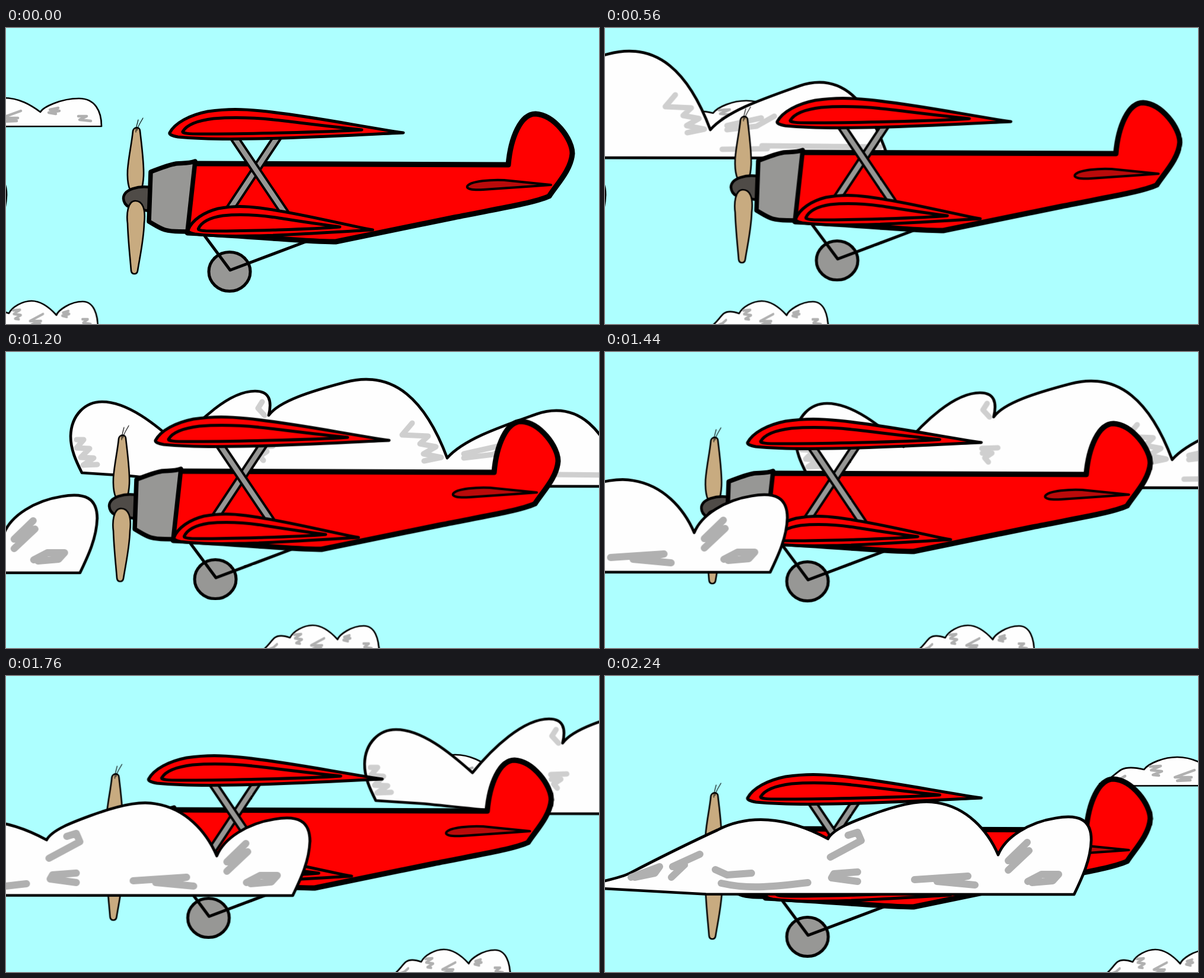
Write an HTML page that moves like this. It is 1000 px wide and 500 px high and loops after 2320 ms.

```html
<!DOCTYPE html>
<html lang="en">
<head>
<meta charset="utf-8">
<title>Biplane</title>
<style>
  html, body { margin: 0; width: 100%; height: 100%; overflow: hidden; background: #adffff; }
  svg { display: block; width: 100%; height: 100%; }
  path, ellipse { stroke: #000; stroke-linejoin: round; stroke-linecap: round; }
  .line { fill: none; }
  .white { fill: #fefefe; }
  .red { fill: #f00; }
  .metal { fill: #979795; }
  .wood { fill: #c8ab80; stroke-width: 2.6; }
  .shade { fill: none; stroke: #b0b0b0; stroke-width: 12; }
  .pale { stroke: #cfcfcf; stroke-width: 9; }
  .fine { stroke-width: 4.5; }
  .fixed { vector-effect: non-scaling-stroke; }

  /* 29 ticks of 80 ms; the last pose holds for one tick */
  .move { animation: drift 2320ms steps(28) -1ms infinite; }
  #high { --x0: 0px; --y0: 0px; --x1: 969px; --y1: 19px; }
  #low { --x0: 0px; --y0: 0px; --x1: 885px; --y1: 1px; }
  #big { --x0: -1062px; --y0: -13.5px; --x1: 920.4px; --y1: 11.8px; }
  #plane { animation-name: fly; }
  #front { animation-name: enter; }
  @keyframes drift {
    0% { transform: translate(var(--x0), var(--y0)); }
    96.552%, 100% { transform: translate(var(--x1), var(--y1)); }
  }
  @keyframes fly {
    0% { transform: translate(0, 0); animation-timing-function: steps(8); }
    27.586% { transform: translate(16.5px, -21.5px); animation-timing-function: steps(9); }
    58.621% { transform: translate(-35.5px, -29.5px); animation-timing-function: steps(11); }
    96.552%, 100% { transform: translate(-35.5px, 29px); }
  }
  @keyframes enter {
    0%, 41.379% { transform: translate(-820px, 5px); animation-timing-function: steps(16); }
    96.552%, 100% { transform: translate(0, 0); }
  }
</style>
</head>
<body>
<svg viewBox="0 0 1000 500">
  <defs>
    <g id="puff">
      <path class="white fixed" stroke-width="2.7" d="M-135 163C-118 158-110 146-98 139C-88 134-72 136-60 139C-52 128-26 118-4 118C22 118 42 130 58 142C62 134 92 119 123 119C150 119 161 140 161 166L-80 166.500Z"/>
      <path class="shade fine" d="M-50 134L-32 133L-48 140L-30 142L-45 148L-35 149M25 140L-8 152L20 152L-4 158L18 157M88 135L74 138L90 140L72 143L84 145M122 149L136 149L124 155L143 157M-92 150L-102 156L-110 158L-98 159"/>
    </g>
    <g id="wing" stroke-width="5">
      <path class="red fixed" d="M276 177C285 160 310 147 340 141C375 136 400 137 430 140C510 148 590 165 670 177C600 180 500 186 420 187C370 188 320 187 290 184C280 182 275 180 276 177Z"/>
      <path class="line fixed" d="M298 175C305 163 325 156 350 153C390 150 430 152 470 157C520 163 560 168 600 172C540 176 400 179 330 179C308 179 297 178 298 175Z"/>
    </g>
  </defs>

  <g id="high" class="move"><use href="#puff"/></g>
  <g id="low" class="move"><use href="#puff" transform="translate(45.600 343) scale(.68 1)"/></g>

  <g id="big" class="move">
    <path class="white" stroke-width="4.700" d="M128 204C118 184 109 165 109 142C110 106 134 84 162 84C205 84 252 122 291 157C325 115 377 66 420 66C444 66 449 82 443 107C460 83 515 66 572 51C655 29 708 83 744 179C772 147 835 126 894 105C965 81 1012 130 1044 227L371 226C300 219 250 213 205 209Z"/>
    <path class="shade pale" d="M119 148L131 148L119 162L141 163L126 178L148 179L130 191L154 190M432 84L425 95L436 107M423 160L450 159M424 168L440 168L428 176L434 183M685 120L668 140L712 142L698 155L725 160L704 172L734 178L705 184M772 172L830 159M772 179L822 173L852 156M764 212L840 211M831 206L1030 208"/>
  </g>

  <g id="plane" class="move">
    <path class="wood" d="M214 174C215 167 226 166 226 174C229 200 233 230 232 250C231 268 228 282 218 282C208 280 204 262 205 240C207 215 212 195 214 174Z"/>
    <path class="line" stroke-width="1.100" d="M219 176C219 168 221 163 223 155M221 173C223 164 227 160 231 152"/>
    <path stroke-width="4.500" fill="#4f4b47" d="M243 269C225 266 198 272 198 288C199 303 215 306 222 306L241 309Z"/>
    <path class="wood" d="M218 292C205 292 203 315 205 330C206 360 209 385 211 410C212 417 221 417 222 410C225 390 232 360 233 330C236 305 230 292 218 292Z"/>

    <ellipse class="metal" stroke-width="5" cx="377" cy="411.500" rx="35" ry="33"/>
    <path class="line" stroke-width="5" d="M332 347L378 409L508 360"/>

    <path class="red" stroke-width="9" d="M318 229L847 231C851 185 868 145 893 145C925 147 955 188 955 212C953 240 928 265 916 284C890 296 820 307 756 320L556 361C520 362 440 353 306 346"/>
    <path fill="#ba0a0a" stroke-width="4" d="M778 267C784 258 820 256 840 257C870 260 900 263 919 265C880 268 835 271 805 273C785 274 776 272 778 267Z"/>

    <g class="line" stroke-linecap="butt">
      <path stroke-width="16" d="M458 184L376 308"/>
      <path style="stroke:#979795" stroke-width="8" d="M458 184L376 308"/>
      <path stroke-width="16" d="M384 184L470 312"/>
      <path style="stroke:#979795" stroke-width="8" d="M384 184L470 312"/>
    </g>
    <use href="#wing"/>
    <use href="#wing" transform="translate(89 164) scale(.79 1)"/>
    <path class="metal" stroke-width="7.500" d="M244 243C262 236 275 231 287 229C298 228 308 229 319 225L306 344C290 343 282 345 268 341C258 338 250 332 241 327Z"/>
  </g>

  <g id="front" class="move">
    <path class="white" stroke-width="4.700" d="M-40 357C-10 347 25 342 42 333C90 308 140 283 190 260C240 234 305 236 376 275C385 258 420 245 450 234C510 212 540 210 560 214C610 222 645 260 663 302C675 272 715 247 760 240C800 233 820 243 820 277C819 310 805 340 791 369L170 368.500Z"/>
    <path class="shade" d="M44 340L92 322L84 333L50 340M160 301L114 322L134 319L112 340M186 327L206 336L247 333M196 350C240 360 275 357 342 349M410 269L426 264L432 278L380 306M426 331L386 334L382 341L426 347M522 344L612 338L560 347L624 353M712 281L680 312L715 295L680 328M713 347L736 335L765 335L755 346L720 349"/>
  </g>
</svg>
</body>
</html>
```
